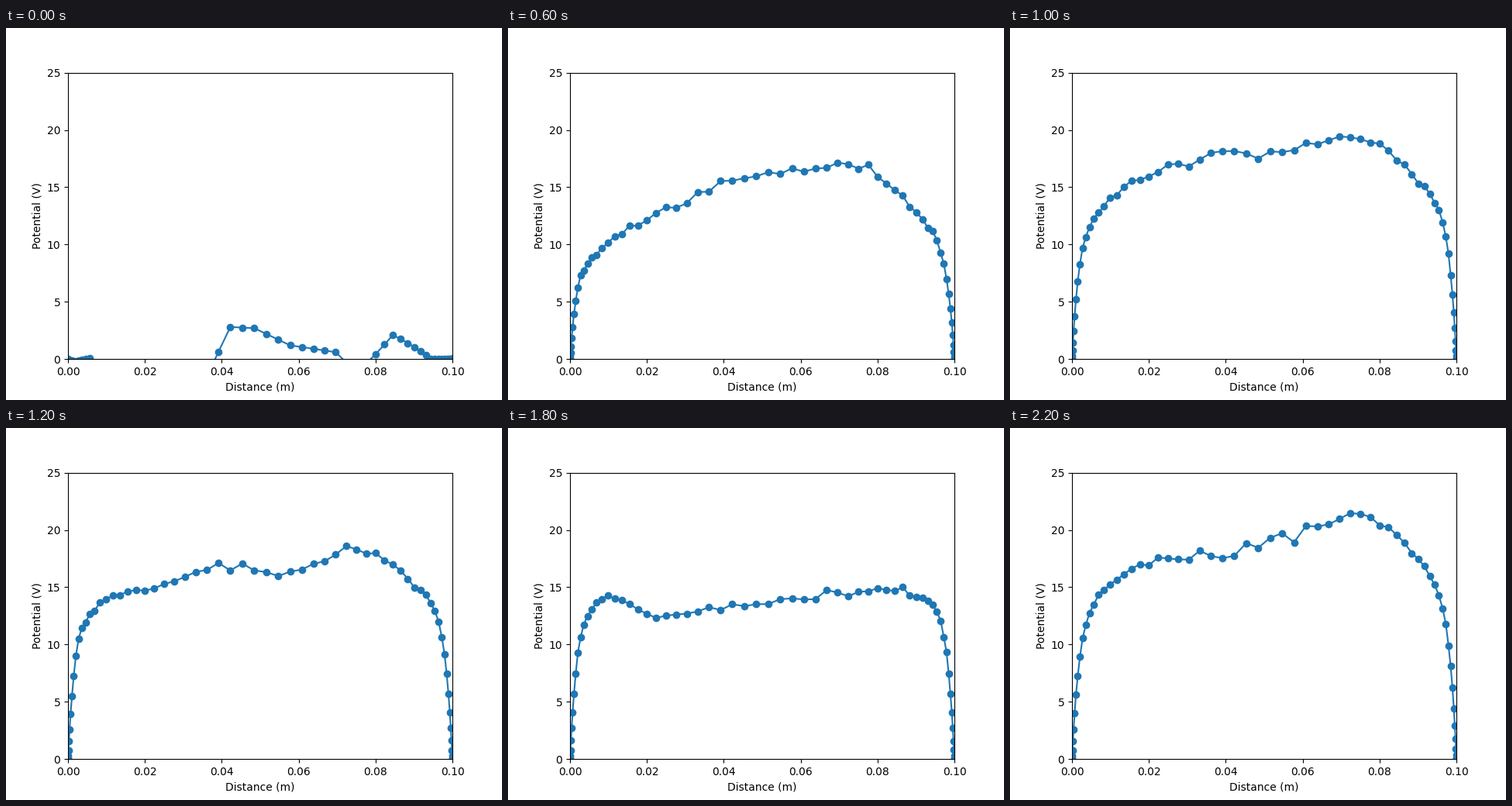
Write a matplotlib script that moves like this. It is 640 px wide and 480 px high and loops after 2300 ms.

```python
import numpy as np
import matplotlib.pyplot as plt
from matplotlib.animation import FuncAnimation

FRAMES, CELLS, LENGTH = 23, 64, 0.1
FIRST, LAST, STEP = 10, 52, 6    # cells that carry the bulk key points

# Cell centres, packed towards both walls
cell = np.arange(CELLS)
s = (cell + 0.5) / CELLS
x = LENGTH * (s - np.sin(2 * np.pi * s) / (2 * np.pi))

# Rise of the potential from either wall to the plateau
r = np.minimum(np.minimum(cell, cell[::-1]) / 11, 1)
sheath = r ** 2 * (1.175 - 1.71 * (r - 0.68) ** 2)


def smooth(values, pos):
    """Cubic Hermite curve through evenly spaced values."""
    p, m = np.array(values), np.gradient(values)
    i = np.clip(pos.astype(int), 0, len(p) - 2)
    u = pos - i
    return ((1 + 2 * u) * (1 - u) ** 2 * p[i] + u * (1 - u) ** 2 * m[i]
            + u ** 2 * (3 - 2 * u) * p[i + 1] + u ** 2 * (u - 1) * m[i + 1])


def profile(*bulk):
    """Smooth bulk curve falling to zero through a sheath at each wall."""
    keys = [0.15 * bulk[0], *bulk, 0.225 * bulk[-1]]
    v = smooth(keys, (cell - FIRST + STEP) / STEP)
    v[:FIRST] = bulk[0] * sheath[:FIRST] / sheath[FIRST]
    v[LAST:] = bulk[-1] * sheath[LAST:]
    return v


# Before the plasma settles: two low humps above zero
startup = np.interp(cell, [0, 9, 13, 20, 27, 29, 31, 34, 38, 40, 44, 50, 63],
                    [0, -.2, .1, -3, -1.5, 2.8, 2.7, 1.2, .6, -1.2, 2.1, 0, 0])

poses = {
    0: startup,
    4: profile(10.3, 10.8, 12.7, 16.8, 17.9, 18.4, 15.4, 11.8),
    8: profile(9.9, 15.3, 19.0, 19.8, 21.0, 21.5, 17.4, 13.0),
    12: profile(10.5, 13.8, 15.0, 16.9, 16.4, 18.2, 15.8, 11.9),
    15: profile(12.4, 17.6, 18.7, 20.4, 21.8, 22.2, 16.2, 12.6),
    18: profile(10.7, 14.1, 12.5, 13.2, 13.8, 14.6, 14.6, 12.0),
    22: profile(10.5, 15.4, 17.4, 17.8, 19.6, 21.3, 17.8, 13.1),
}
times = list(poses)


def level(t):
    """Plateau potential, swinging at the plasma oscillation period."""
    return 19 + 4.5 * np.cos(2 * np.pi * (t - 1.6) / 6.65) if t else 0


def potential(t):
    if t == 0:
        return startup
    b = next(k for k in times if k >= t)
    a = times[times.index(b) - 1]
    u = (t - a) / (b - a)
    swing = level(t) - (1 - u) * level(a) - u * level(b)
    noise = np.random.default_rng(t).normal(0, 0.3, CELLS)
    return ((1 - u) * poses[a] + u * poses[b] + swing * sheath
            + noise * np.sin(np.pi * s) ** 2)


fig, ax = plt.subplots(figsize=(6.4, 4.8), dpi=100)
line, = ax.plot(x, potential(0), "o-", color="#1f77b4")
ax.set(xlim=(0, LENGTH), ylim=(0, 25),
       xlabel="Distance (m)", ylabel="Potential (V)")


def update(t):
    line.set_ydata(potential(t))
    return line,


anim = FuncAnimation(fig, update, frames=FRAMES, interval=100,
                     repeat=True, repeat_delay=0)
plt.show()
```
